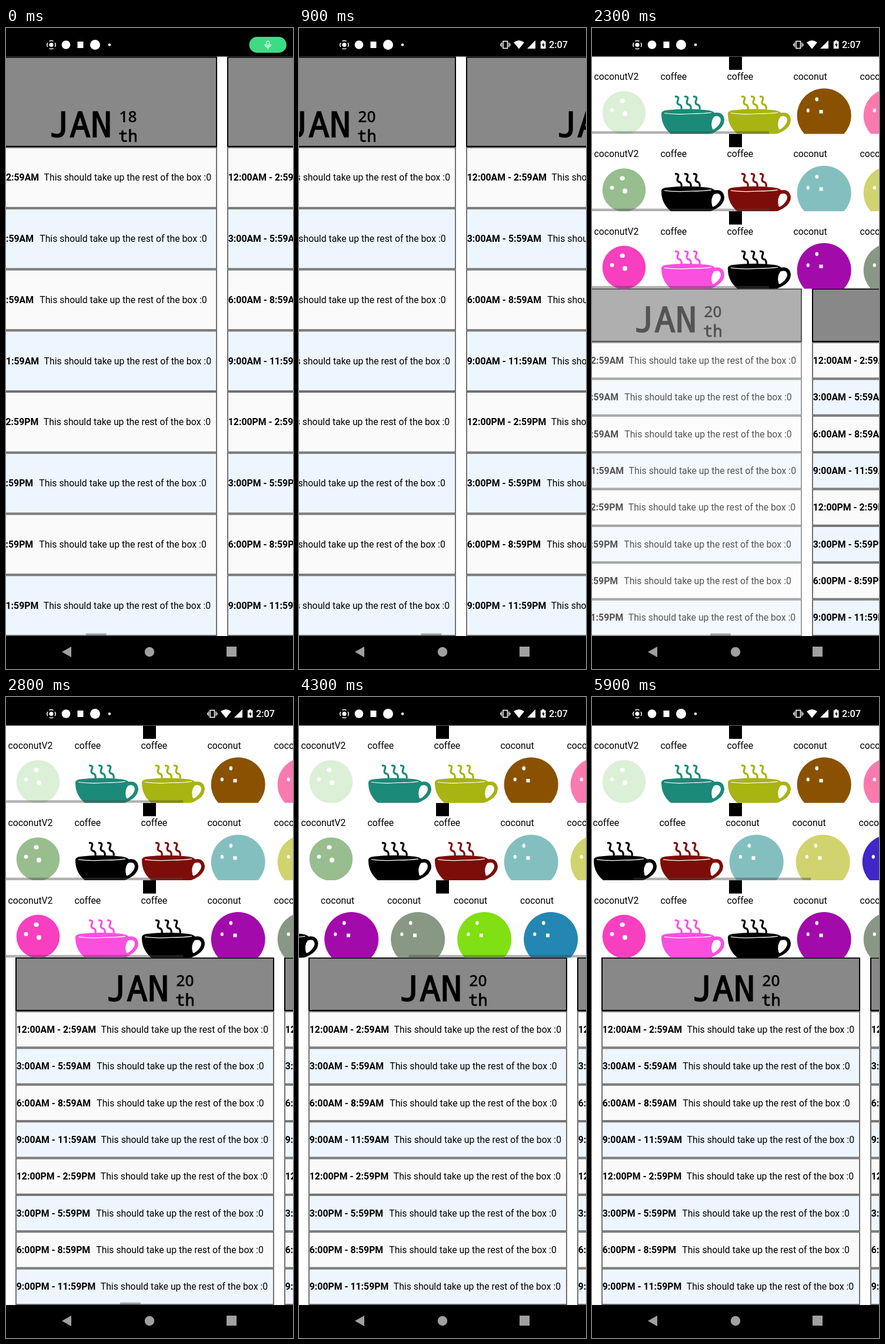
An HTML page with a canvas that plays this animation: 488 by 1088 pixels, repeating every 6 s.

```html
<!DOCTYPE html>
<html lang="en">
<head>
<meta charset="utf-8">
<title>Calendar</title>
<style>
  html, body { margin: 0; width: 100%; height: 100%; overflow: hidden; background: #000; }
  canvas { display: block; width: 488px; height: 1088px; }
</style>
</head>
<body>
<canvas id="stage"></canvas>
<script>
const W = 488, H = 1088, LOOP = 6000, STEP = 100;
const TOP = 48.5, BOTTOM = 1032, SHELF_H = 131.3, ITEM_W = 113;
const CARD_W = 440, PITCH = 457.2, CARDS = 15, FIRST_DAY = 14;
const SHELVES_OPEN = 2200;
const SANS = 'Roboto, sans-serif';
const MONO = '"Noto Sans Mono", "DejaVu Sans Mono", monospace';

const canvas = document.getElementById('stage');
const ratio = window.devicePixelRatio || 1;
canvas.width = W * ratio;
canvas.height = H * ratio;
const ctx = canvas.getContext('2d');
ctx.scale(ratio, ratio);

// Each track is a list of [ms, value] steps.
const TRACKS = {
  drift: [[800, 2922], [900, 2916], [1400, 2878.5], [2100, 2871], [2200, 2853], [2300, 2826.5],
          [2400, 2785], [2500, 2751], [2600, 2733], [2700, 2727.5]],
  cardBar: [[3000, 1], [3250, 0]],
  press: [[1950, 1], [2100, .45], [2200, .4], [2300, .67], [2400, .94], [2500, 1]],
  pill: [[350, 1], [550, 0]],
  status: [[500, 0], [700, 1]],
  idleBar: [[3450, 1], [3700, 0]],
  middle: [[5300, 0], [5500, 22], [5700, 75], [5900, 115]],
  middleBar: [[3450, 1], [3700, 0], [5250, 0], [5300, 1]],
  lower: [[3000, 0], [3200, 50], [3400, 138], [3700, 255], [3900, 300], [4100, 305.5],
          [4600, 305.5], [4800, 215], [5000, 85], [5200, 12], [5300, 0]],
  lowerBar: [[5600, 1], [5850, 0]]
};

const SHELVES = [
  { items: 'V2 #dbf0d6,coffee #1c8a78,coffee #a8b411,coconut #8a5200,coconut #fa7ab0,coconut #5a9c60,coconut #d08030',
    bar: 'idleBar' },
  { items: 'V2 #98bd8f,coffee #000000,coffee #7d0d08,coconut #84bfc0,coconut #d1d36e,coconut #4126c8,coconut #50a080',
    scroll: 'middle', bar: 'middleBar' },
  { items: 'V2 #f83fc0,coffee #fb4fe0,coffee #000000,coconut #a30aac,coconut #889884,coconut #80e014,coconut #2486b2',
    scroll: 'lower', bar: 'lowerBar' }
].map(shelf => ({ ...shelf, items: shelf.items.split(',').map(s => s.split(' ')) }));

const SLOTS = ['AM', 'PM'].flatMap(half => [12, 3, 6, 9].map(hour =>
  `${hour}:00${half} - ${hour % 12 + 2}:59${half}`));

function track(name, t) {
  const steps = TRACKS[name];
  if (t <= steps[0][0]) return steps[0][1];
  for (let i = 1; i < steps.length; i++) {
    const [t0, a] = steps[i - 1], [t1, b] = steps[i];
    if (t <= t1) return a + (b - a) * (t - t0) / (t1 - t0);
  }
  return steps[steps.length - 1][1];
}

function cardScroll(t) {
  return t < 800 ? 2922 - 1012 * (1 - t / 800) ** 2 : track('drift', t);
}

function rect(x, y, w, h, color) {
  ctx.fillStyle = color;
  ctx.fillRect(x, y, w, h);
}

function frame(x, y, w, h, fill, border) {
  rect(x, y, w, h, border);
  rect(x + 2, y + 2, w - 4, h - 4, fill);
}

function ellipse(x, y, rx, ry, color) {
  ctx.fillStyle = color;
  ctx.beginPath();
  ctx.ellipse(x, y, rx, ry, 0, 0, 7);
  ctx.fill();
}

const dot = (x, y, r, color) => ellipse(x, y, r, r, color);

function text(str, x, y, font, color = '#000', align = 'left') {
  ctx.font = font;
  ctx.fillStyle = color;
  ctx.textAlign = align;
  ctx.fillText(str, x, y);
}

// Regular weight thickened by a thin outline, like a synthetic bold.
function thickText(str, x, y, font, line, align) {
  text(str, x, y, font, '#000', align);
  ctx.lineWidth = line;
  ctx.strokeStyle = '#000';
  ctx.strokeText(str, x, y);
}

function shape(d, color, line = 0) {
  const path = new Path2D(d);
  if (line) {
    ctx.lineWidth = line;
    ctx.strokeStyle = color;
    ctx.stroke(path);
  } else {
    ctx.fillStyle = color;
    ctx.fill(path);
  }
}

function scoped(draw) {
  ctx.save();
  draw();
  ctx.restore();
}

function clip(x, y, w, h) {
  ctx.beginPath();
  ctx.rect(x, y, w, h);
  ctx.clip();
}

function scrollBar(scroll, content, bottom, alpha) {
  const width = W * W / content;
  const x = Math.min(scroll * W / content, W - width);
  rect(x, bottom - 4.5, width, 4.5, `rgba(70,70,70,${.42 * alpha})`);
}

function suffix(day) {
  return day > 3 && day < 21 ? 'th' : ['th', 'st', 'nd', 'rd'][day % 10] || 'th';
}

function card(x, top, day) {
  const headBottom = top > TOP ? 533 : 202;
  const rowH = (BOTTOM - headBottom) / SLOTS.length;
  frame(x, top, CARD_W, headBottom - top, '#888', '#000');
  thickText('JAN', x + 153, headBottom - 17, '400 60px ' + MONO, 1.6);
  text(day, x + 288.5, headBottom - 42, '600 26.5px "Open Sans", "Noto Sans", sans-serif', '#000', 'center');
  thickText(suffix(day), x + 288.5, headBottom - 9, '400 27px ' + MONO, .8, 'center');
  SLOTS.forEach((slot, i) => {
    const y = headBottom + i * rowH;
    frame(x, y, CARD_W, rowH, i % 2 ? '#edf6ff' : '#fafafa', '#707070');
    const base = y + rowH / 2 + 5.6;
    text(slot, x + 1.8, base, '700 15.8px ' + SANS);
    const gap = slot.length > 15 ? 8.5 : 10.2;
    const start = x + 1.8 + ctx.measureText(slot).width + gap;
    text('This should take up the rest of the box :0', start, base, '15.8px ' + SANS);
  });
}

function calendar(t) {
  const top = t < SHELVES_OPEN ? TOP : 442;
  const scroll = cardScroll(t);
  for (let i = 0; i < CARDS; i++) {
    const x = Math.round(i * PITCH - scroll);
    if (x > W || x < -CARD_W) continue;
    const day = FIRST_DAY + i;
    card(x, top, day);
    if (day === 20) rect(x, top, CARD_W, BOTTOM - top, `rgba(255,255,255,${1 - track('press', t)})`);
  }
  scrollBar(scroll, PITCH * CARDS, BOTTOM, track('cardBar', t));
}

const PICTURES = {
  V2(color) {
    dot(54.5, 95.3, 36.8, color);
    ellipse(51.5, 75.3, 4.2, 3.7, '#fff');
    dot(34, 91.3, 3.4, '#fff');
    ellipse(56, 97, 4, 4.2, '#fff');
  },
  coconut(color) {
    dot(55.7, 100, 46, color);
    ellipse(43.3, 72.5, 2.8, 3.4, '#fff');
    ellipse(28.3, 91.5, 2.6, 3.2, '#fff');
    rect(47.5, 90.5, 6, 6, '#fff');
  },
  coffee(color) {
    shape('M88 101Q107 93 109 107Q109 121 86 129', color, 6);
    shape('M5 98Q4 92 14 91Q48 87 84 91Q98 93 97 100Q92 103 92 110Q89 120 93 125L84 133H23Q5 119 5 98Z', color);
    shape('M10 96Q30 99 56 97Q76 97 90 95', '#fff', 1.2);
    for (const x of [28, 44, 59]) {
      shape(`M${x} 68q8 -1 5 6t4 8q3 3 2 8`, color, 3.2);
    }
    shape('M92 106Q105 98 105 109Q103 119 93 124Q88 116 92 106Z', '#fff');
  }
};

function shelf({ items, scroll, bar }, index, t) {
  const y = TOP + index * SHELF_H;
  const offset = scroll ? track(scroll, t) : 0;
  scoped(() => {
    clip(0, y, W, SHELF_H);
    rect(0, y, W, SHELF_H, '#fff');
    rect(233, y, 22, 22.5, '#000');
    items.forEach(([kind, color], i) => scoped(() => {
      ctx.translate(i * ITEM_W - offset, y);
      text(kind === 'V2' ? 'coconutV2' : kind, 3.4, 39.5, '15.8px ' + SANS);
      PICTURES[kind](color);
    }));
    scrollBar(offset, ITEM_W * items.length, y + SHELF_H, track(bar, t));
  });
}

function statusBar(t) {
  rect(0, 0, W, TOP, '#000');
  dot(77, 28.5, 3.6, '#fff');
  shape('M73.5 22.4A7 7 0 0 1 80.5 22.4M83.2 25A7 7 0 0 1 83.2 32M80.5 34.6A7 7 0 0 1 73.5 34.6M70.8 32A7 7 0 0 1 70.8 25', '#fff', 1.5);
  dot(102, 28.5, 7.3, '#fff');
  rect(121.5, 23, 10, 11, '#fff');
  dot(151.5, 28.5, 8.5, '#fff');
  dot(176, 28.5, 2.3, '#fff');

  scoped(() => {
    ctx.globalAlpha = track('status', t);
    ctx.lineWidth = 1.6;
    ctx.strokeStyle = '#fff';
    ctx.strokeRect(347, 22.5, 7.5, 12);
    shape('M344.5 24.5V32.5M357 24.5V32.5M342.7 26.5V30.5M359 26.5V30.5', '#fff', 1.3);
    shape('M365 24.5Q374 17.5 383 24.5L374 35.5Z', '#fff');
    shape('M402 21V35H388Z', '#fff');
    shape('M413 21H417V22.5H419.5V35H410.8V22.5H413Z', '#fff');
    shape('M416 24.5L413 29.5H415V33L417.8 28H416Z', '#000');
    text('2:07', 425, 34, '500 16.3px ' + SANS, '#fff');
  });

  scoped(() => {
    ctx.globalAlpha = track('pill', t);
    ctx.fillStyle = '#3ddc84';
    ctx.beginPath();
    ctx.roundRect(413.5, 15, 63.5, 27, 13.5);
    ctx.fill();
    shape('M443 24.5A2.3 2.3 0 0 1 447.6 24.5V28A2.3 2.3 0 0 1 443 28Z', '#fff', 1.2);
    shape('M440.3 27.5Q440.5 32.5 445.3 32.5Q450 32.5 450.3 27.5M445.3 32.5V36', '#fff', 1.2);
  });
}

function navBar() {
  const gray = '#a0a0a0';
  rect(0, BOTTOM, W, H - BOTTOM, '#000');
  shape('M95 1059L111 1050V1068Z', gray);
  dot(244, 1059, 8.2, gray);
  rect(375, 1050, 17, 17, gray);
}

function draw(t) {
  rect(0, 0, W, H, '#fff');
  calendar(t);
  if (t >= SHELVES_OPEN) SHELVES.forEach((s, i) => shelf(s, i, t));
  statusBar(t);
  navBar();
}

const begin = performance.now();
function tick() {
  const elapsed = performance.now() - begin;
  draw(Math.floor(elapsed / STEP) * STEP % LOOP);
  requestAnimationFrame(tick);
}
tick();
</script>
</body>
</html>
```
